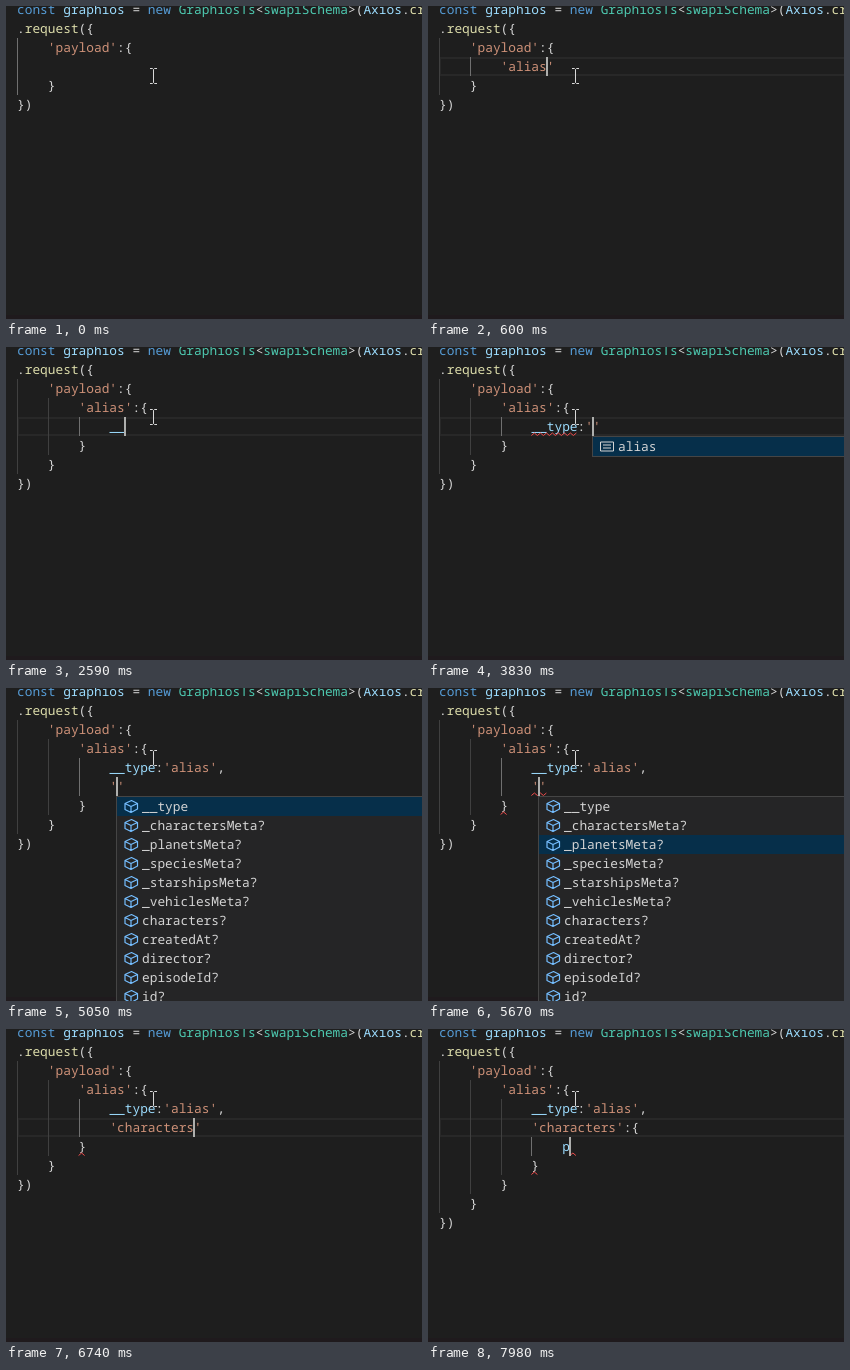
An HTML page for the animation above (8000 ms loop, 416 by 313 pixels).

```html
<!DOCTYPE html>
<html lang="en">
<head>
<meta charset="utf-8">
<title>Typed query autocompletion</title>
<style>
  html, body { margin: 0; width: 100%; height: 100%; overflow: hidden; background: #1e1e1e; }
  svg { display: block; width: 416px; height: 313px; }
  text {
    font-family: "Noto Sans Mono", "DejaVu Sans Mono", monospace;
    font-size: 12.83px;
    fill: #d4d4d4;
    white-space: pre;
    text-rendering: geometricPrecision;
  }
  .key { fill: #569cd6; }
  .type { fill: #4ec9b0; }
  .var { fill: #9cdcfe; }
  .func { fill: #dcdcaa; }
  .str { fill: #ce9178; }
  .line { fill: none; stroke: #282828; stroke-width: 2; }
  .wave { fill: none; stroke: #f14c4c; stroke-width: 1; }
  .cube { fill: none; stroke: #75beff; stroke-width: 1.2; stroke-linejoin: round; }
  .word { fill: none; stroke: #d4d4d4; }
  .beam { fill: none; stroke: #d8d8d8; stroke-width: 1; }
</style>
</head>
<body>
<svg viewBox="0 0 416 313">
  <rect width="416" height="313" fill="#1e1e1e"/>
  <rect y="309" width="416" height="4" fill="#1f1a1d"/>
  <g id="view"></g>
  <path class="beam" d="M144 62.5h2.5l1 1 1-1h2.500M147.500 63.500V76.500M144 77.500h2.500l1-1 1 1h2.500"/>
</svg>
<script>
const LOOP = 8000, CHAR = 7.7, ROW = 19, LEFT = 11;
const view = document.getElementById('view');
const colX = c => LEFT + c * CHAR;
const rowY = r => r * ROW - 6;

const HEAD = [
  'const graphios = new GraphiosTs<swapiSchema>(Axios.create',
  '.request({',
  "    'payload':{",
];
const FIELDS = ['__type', '_charactersMeta?', '_planetsMeta?', '_speciesMeta?',
  '_starshipsMeta?', '_vehiclesMeta?', 'characters?', 'createdAt?',
  'director?', 'episodeId?', 'id?'];

const ALIAS = "        'alias':{";
const in12 = s => ' '.repeat(12) + s;
const TYPE = in12("__type:'alias',");

const popup = (row, col, items, sel = 0, icon = 'cube') => ({ row, col, items, sel, icon });
const fields = sel => popup(6, 13, FIELDS, sel);
const aliasWord = popup(5, 20, ['alias'], 0, 'word');

// Each step changes only the listed parts of the previous one.
// body: lines inside the payload, depth: braces left to close, at: caret row and column,
// on: caret shown, hl: highlighted row, waves: [row, column, length]
const STEPS = [
  [0, { body: [''], depth: 1, at: [3, 8], on: false, hl: null, waves: [], pop: null }],
  [150, { body: ["        ''"], at: [3, 9], on: true, hl: 3 }],
  [300, { body: ["        'al'"], at: [3, 11] }],
  [450, { body: ["        'ali'"], at: [3, 12] }],
  [600, { body: ["        'alias'"], at: [3, 14] }],
  [900, { at: [3, 15] }],
  [1200, { body: ["        'alias':"], at: [3, 16] }],
  [1350, { body: ["        'alias':{}"], at: [3, 17] }],
  [1520, { body: [ALIAS, ''], depth: 2, at: [4, 12] }],
  [1840, { hl: 4 }],
  [1970, { on: false, waves: [[3, 8, 7]] }],
  [2140, { body: [ALIAS, in12('_')], at: [4, 13], on: true, pop: popup(5, 12, FIELDS.slice(0, 6)) }],
  [2290, { body: [ALIAS, in12('__')], at: [4, 14], pop: popup(5, 12, ['__type']) }],
  [2590, { waves: [], pop: null }],
  [2910, { body: [ALIAS, in12('__ty')], at: [4, 16] }],
  [3060, { body: [ALIAS, in12('__type')], at: [4, 18] }],
  [3210, { body: [ALIAS, in12('__type:')], at: [4, 19] }],
  [3510, { body: [ALIAS, in12("__type:''")], at: [4, 20] }],
  [3660, { pop: aliasWord }],
  [3830, { waves: [[4, 12, 6]] }],
  [3980, { body: [ALIAS, in12("__type:'alias'")], at: [4, 25], pop: null }],
  [4280, { at: [4, 26], waves: [] }],
  [4580, { body: [ALIAS, TYPE], at: [4, 27] }],
  [4900, { body: [ALIAS, TYPE, ''], at: [5, 12], hl: null }],
  [5050, { body: [ALIAS, TYPE, in12("''")], at: [5, 13], pop: fields(0) }],
  [5350, { waves: [[5, 12, 2], [6, 8, 1]] }],
  ...[5500, 5650, 5820, 5970, 6140, 6270].map((t, i) => [t, { pop: fields(i + 1) }]),
  [6420, { body: [ALIAS, TYPE, in12("'characters'")], at: [5, 23], hl: 5, pop: null }],
  [6740, { waves: [[6, 8, 1]] }],
  [6890, { at: [5, 24] }],
  [7190, { body: [ALIAS, TYPE, in12("'characters':")], at: [5, 25] }],
  [7510, { body: [ALIAS, TYPE, in12("'characters':{}")], at: [5, 26] }],
  [7810, { body: [ALIAS, TYPE, in12("'characters':{"), ''], depth: 3, at: [6, 16], waves: [] }],
  [7980, { body: [ALIAS, TYPE, in12("'characters':{"), ' '.repeat(16) + 'p'], at: [6, 17],
    waves: [[6, 17, 1], [7, 12, 1]] }],
];

const states = [];
for (const [time, change] of STEPS) states.push({ ...states.at(-1), ...change, time });

const esc = s => s.replace(/&/g, '&amp;').replace(/</g, '&lt;').replace(/>/g, '&gt;');

function tokenClass(word) {
  if (word[0] === "'") return 'str';
  if (/^(const|new)$/.test(word)) return 'key';
  if (/^(GraphiosTs|swapiSchema)$/.test(word)) return 'type';
  if (/^(request|create)$/.test(word)) return 'func';
  return 'var';
}

const paint = line => line.split(/('[^']*'|\w+)/).map((part, i) =>
  i % 2 ? `<tspan class="${tokenClass(part)}">${part}</tspan>` : esc(part)).join('');

const label = (x, y, markup) => `<text x="${x}" y="${y + 14}">${markup}</text>`;
const rect = (x, y, w, h, fill) =>
  `<rect x="${x}" y="${y}" width="${w}" height="${h}" fill="${fill}"/>`;

function allLines({ body, depth }) {
  const closers = [];
  for (let i = depth; i > 0; i--) closers.push(' '.repeat(4 * i) + '}');
  return [...HEAD, ...body, ...closers, '})'];
}

function drawGuides(lines, row) {
  const indent = s => s.search(/\S/);
  const depths = lines.map((s, r) => {
    if (s) return indent(s) / 4;
    const above = indent(lines[r - 1]), below = indent(lines[r + 1]);
    return below / 4 + (above > below ? 1 : 0);
  });
  const active = depths[row];
  let first = row, last = row;
  while (depths[first - 1] >= active) first--;
  while (depths[last + 1] >= active) last++;
  let out = '';
  depths.forEach((depth, r) => {
    for (let d = 0; d < depth; d++) {
      const lit = d === active - 1 && r >= first && r <= last;
      out += rect(Math.round(colX(d * 4)), rowY(r), 1, ROW, lit ? '#707070' : '#404040');
    }
  });
  return out;
}

function drawWave([row, col, len]) {
  const x = colX(col), end = x + len * CHAR, y = rowY(row) + 18.5;
  let d = `M${x} ${y}`;
  for (let i = 1; x + i * 3 <= end; i++) d += `L${x + i * 3} ${y - (i % 2) * 2.5}`;
  return `<path class="wave" d="${d}"/>`;
}

const ICONS = {
  cube: '<path class="cube" d="M1 4L7.500 1L13.500 4V9.500L7 13L1 10ZM1 4L7 7L13.500 4M7 7V13"/>',
  word: '<path class="word" d="M.5 2.500h13v9h-13zM3 5.500h8M3 8.500h8"/>',
};

function drawPopup({ row, col, items, sel, icon }) {
  const x = Math.round(colX(col)), y = rowY(row);
  const h = items.length * ROW;
  let out = rect(x - 1, y, 420, h + 2, '#454545') + rect(x, y + 1, 420, h, '#252526');
  items.forEach((name, i) => {
    const top = y + 1 + i * ROW;
    if (i === sel) out += rect(x, top, 420, ROW, '#062f4a');
    out += `<g transform="translate(${x + 7} ${top + 2.5})">${ICONS[icon]}</g>`;
    out += label(x + 25, top, name);
  });
  return out;
}

function draw(s) {
  const lines = allLines(s);
  let out = '';
  if (s.hl !== null) {
    out += `<rect class="line" x="${LEFT + 1}" y="${rowY(s.hl) + 1}" width="420" height="${ROW - 2}"/>`;
  }
  out += drawGuides(lines, s.at[0]);
  lines.forEach((line, r) => { out += label(LEFT, rowY(r), paint(line)); });
  out += s.waves.map(drawWave).join('');
  if (s.pop) out += drawPopup(s.pop);
  if (s.on) out += rect(Math.round(colX(s.at[1])) - 1, rowY(s.at[0]), 2, ROW, '#aeafad');
  view.innerHTML = out;
}

let shown = null;
const start = performance.now();
function tick() {
  const t = (performance.now() - start) % LOOP;
  const state = states.findLast(s => s.time <= t);
  if (state !== shown) draw(shown = state);
  requestAnimationFrame(tick);
}
tick();
</script>
</body>
</html>
```
